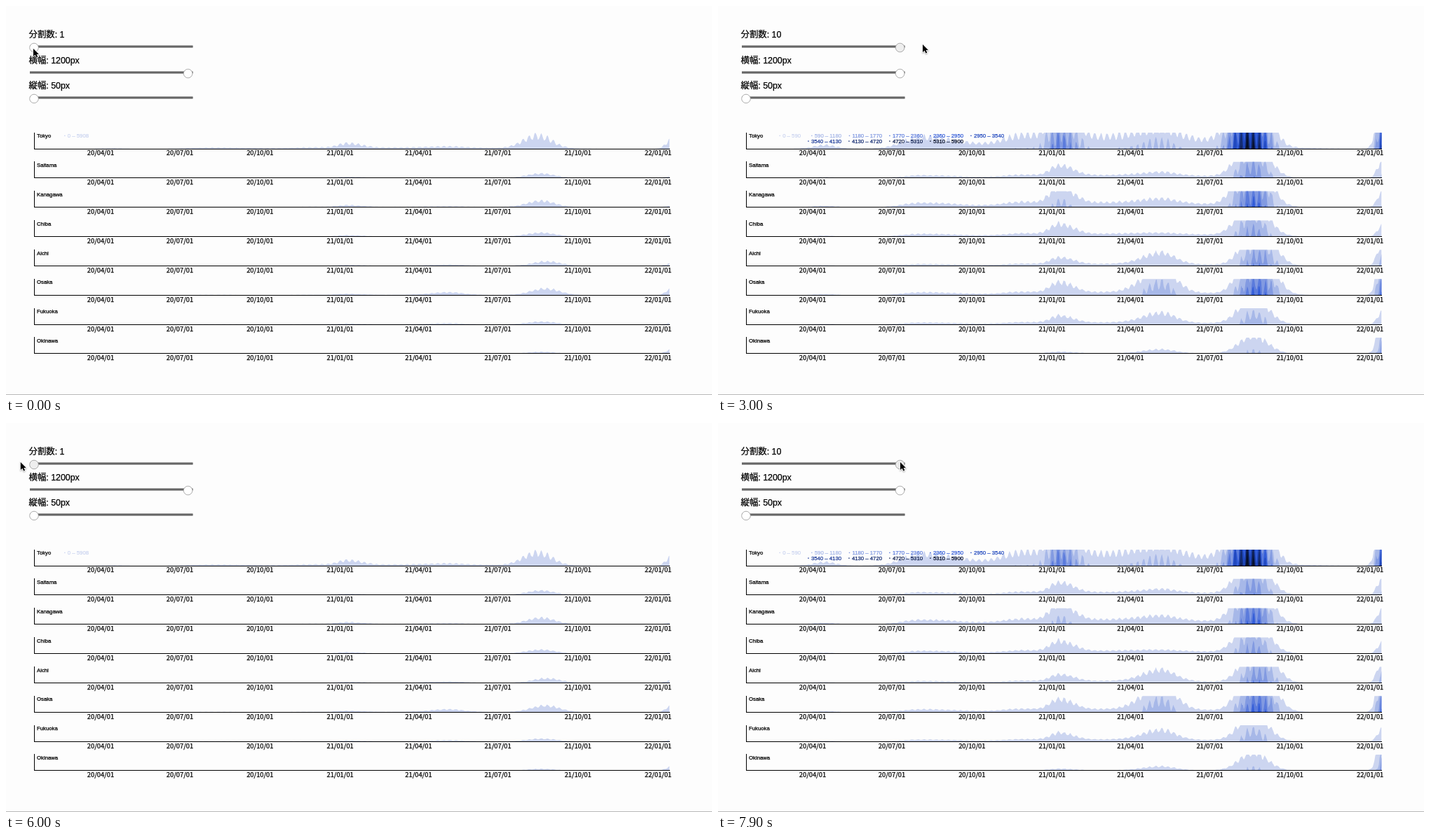
An HTML page with a canvas that plays this animation: 1007x556 px, repeating every 8000 ms.

```html
<!DOCTYPE html>
<html lang="ja">
<head>
<meta charset="utf-8">
<title>Horizon chart</title>
<style>
html, body { margin: 0; width: 100%; height: 100%; overflow: hidden; background: #fdfdfd; }
canvas { display: block; }
</style>
</head>
<body>
<canvas id="stage" width="1007" height="556"></canvas>
<script>
const ctx = document.getElementById('stage').getContext('2d');
const LOOP = 8000, FRAME = 100;
const LEFT = 40.5, RIGHT = 947, DAY = 1.2425, DAYS = 730;
const BAND = 23, FIRST_BASE = 204, ROW = 41.85, MAX = 5908;
const LATIN = '"Liberation Sans", "Noto Sans CJK JP", "Noto Sans CJK", sans-serif';
const JAPANESE = '"Noto Sans CJK JP", "Noto Sans CJK", "Noto Sans", sans-serif';

// Smooth curve through points that never overshoots them.
function curve(xs, ys) {
  const last = xs.length - 1;
  const secant = i => (ys[i + 1] - ys[i]) / (xs[i + 1] - xs[i]);
  const slope = xs.map((_, i) => {
    if (i === 0) return secant(0);
    if (i === last) return secant(last - 1);
    const a = secant(i - 1), b = secant(i);
    return a * b > 0 ? 2 * a * b / (a + b) : 0;
  });
  return x => {
    if (x <= xs[0]) return ys[0];
    if (x >= xs[last]) return ys[last];
    let i = 0;
    while (x > xs[i + 1]) i++;
    const h = xs[i + 1] - xs[i], u = (x - xs[i]) / h, v = 1 - u;
    return v * v * ((1 + 2 * u) * ys[i] + u * h * slope[i])
         + u * u * ((1 + 2 * v) * ys[i + 1] - v * h * slope[i + 1]);
  };
}

const hill = (x, center, rise, fall = rise) =>
  Math.exp(-0.5 * ((x - center) / (x < center ? rise : fall)) ** 2);

const noise = (a, b) => {
  const s = Math.sin(a * 12.9898 + b * 78.233) * 43758.5453;
  return s - Math.floor(s);
};

// Wave heights per region; lag moves the summer wave to the right.
const REGIONS = [
  { name: 'Tokyo', winter: 1600, spring: 320, summer: 4500, newYear: 3000, lag: 0 },
  { name: 'Saitama', winter: 380, spring: 110, summer: 1550, newYear: 640, lag: 5 },
  { name: 'Kanagawa', winter: 640, spring: 130, summer: 2250, newYear: 580, lag: 5 },
  { name: 'Chiba', winter: 380, spring: 30, summer: 1350, newYear: 400, lag: 5 },
  { name: 'Aichi', winter: 260, spring: 400, summer: 1550, newYear: 900, lag: 13 },
  { name: 'Osaka', winter: 400, spring: 900, summer: 2300, newYear: 2050, lag: 11 },
  { name: 'Fukuoka', winter: 260, spring: 340, summer: 960, newYear: 460, lag: 6 },
  { name: 'Okinawa', winter: 60, spring: 140, summer: 640, newYear: 1400, lag: 6 }
];

// The minor waves and the long plateau scale with the winter wave.
const level = (x, r) =>
  r.winter * (0.08 * hill(x, 152, 16) + 0.25 * hill(x, 290, 26, 55)
    + 0.22 * hill(x, 435, 28) + hill(x, 487, 13, 20) + 0.3 * hill(x, 600, 100))
  + r.spring * hill(x, 632, 25, 20)
  + r.summer * hill(x, 758 + r.lag, 20)
  + r.newYear * hill(x, 948, 7);

const rows = REGIONS.map((region, r) => {
  const swing = r === 0 ? 0.29 : 0.2;
  const days = Array.from({ length: DAYS }, (_, d) => {
    const week = 1 + swing * Math.cos(2 * Math.PI * (d - 575) / 7);
    const jitter = 0.93 + 0.14 * noise(d, r);
    return Math.min(MAX, level(LEFT + d * DAY, region) * week * jitter);
  });
  return { name: region.name, days, base: FIRST_BASE + r * ROW };
});

const START = Date.UTC(2020, 0, 16);
const ticks = Array.from({ length: 8 }, (_, i) => {
  const date = new Date(Date.UTC(2020, 3 + 3 * i, 1));
  return {
    x: LEFT + (date - START) / 864e5 * DAY,
    label: date.toISOString().slice(2, 10).replace(/-/g, '/')
  };
});

// Pointer path: time, x, y.
const PATH = [[0, 39, 61], [600, 41, 61], [1200, 105, 56.5], [2700, 292, 55],
  [3300, 292, 55], [4200, 171, 63], [4900, 70, 56], [5450, 15, 56],
  [5900, 18, 56], [6900, 120, 56], [7900, 260, 56]];
const times = PATH.map(p => p[0]);
const pointerX = curve(times, PATH.map(p => p[1]));
const pointerY = curve(times, PATH.map(p => p[2]));
const KNOB_MIN = 40, KNOB_STEP = 24.4, DRAG_DELAY = 45;

function bandsAt(t) {
  const n = 1 + Math.round((pointerX(t - DRAG_DELAY) - KNOB_MIN) / KNOB_STEP);
  return Math.max(1, Math.min(10, n));
}

function bandColor(i, n) {
  const f = i / n;
  return `hsl(225, ${55 + 16 * Math.min(1, f * 2)}%, ${87 * (1 - f)}%)`;
}

function text(str, x, y, size, family = LATIN, align = 'left', color = '#000') {
  ctx.font = `${size}px ${family}`;
  ctx.textAlign = align;
  ctx.fillStyle = ctx.strokeStyle = color;
  ctx.lineWidth = 0.25;
  ctx.fillText(str, x, y);
  ctx.strokeText(str, x, y);
}

function slider(label, y, knobX, active) {
  text(label, 32.5, y - 12.6, 12.4);
  ctx.fillStyle = '#a4a4a4';
  ctx.fillRect(34, y - 2, 232.5, 4);
  ctx.fillStyle = '#666';
  ctx.fillRect(34, y - 1, 232.5, 2);
  ctx.beginPath();
  ctx.arc(knobX, y + 1.5, 6.3, 0, 2 * Math.PI);
  ctx.fillStyle = active ? '#eee' : '#fff';
  ctx.fill();
  ctx.strokeStyle = '#999';
  ctx.lineWidth = 0.8;
  ctx.stroke();
}

function horizon(days, base, n) {
  const step = Math.floor(MAX / n);
  for (let i = 0; i < n; i++) {
    ctx.beginPath();
    ctx.moveTo(LEFT, base);
    days.forEach((v, d) => {
      const part = Math.max(0, Math.min(1, (v - i * step) / step));
      ctx.lineTo(LEFT + d * DAY, base - part * BAND);
    });
    ctx.lineTo(LEFT + (DAYS - 1) * DAY, base);
    ctx.fillStyle = bandColor(i, n);
    ctx.fill();
  }
}

function axes(name, base) {
  const y = Math.floor(base);
  ctx.fillStyle = '#000';
  ctx.fillRect(40, y - 23, 1, 24);
  ctx.fillRect(40, y, RIGHT - 40, 1);
  text(name, 44, base - 15.8, 7.75);
  for (const tick of ticks) text(tick.label, tick.x, base + 9.4, 9.3, JAPANESE, 'center');
}

function legend(n) {
  const step = Math.floor(MAX / n), half = Math.floor(n / 2);
  for (let i = 0; i < n; i++) {
    const lower = i > half;
    const right = 118 + 58 * (lower ? i - half : i);
    const y = lower ? 196 : 188.2;
    const label = `${i * step} – ${(i + 1) * step}`;
    text(label, right, y, 7.75, LATIN, 'right', bandColor(i, n));
    ctx.fillRect(right - ctx.measureText(label).width - 4.7, y - 3.5, 1.4, 1.4);
  }
}

function pointer(x, y) {
  ctx.save();
  ctx.translate(x, y);
  ctx.beginPath();
  [[0, 0], [0, 11], [2.6, 8.7], [4.4, 12.6], [6.3, 11.8], [4.6, 8], [7.9, 7.9]]
    .forEach(p => ctx.lineTo(...p));
  ctx.closePath();
  ctx.shadowColor = 'rgba(0, 0, 0, 0.35)';
  ctx.shadowBlur = 2;
  ctx.shadowOffsetY = 1;
  ctx.strokeStyle = '#fff';
  ctx.lineWidth = 1.4;
  ctx.stroke();
  ctx.shadowColor = 'transparent';
  ctx.fillStyle = '#000';
  ctx.fill();
  ctx.restore();
}

function draw(now) {
  const t = Math.floor(now % LOOP / FRAME) * FRAME;
  const n = bandsAt(t);
  ctx.fillStyle = '#fdfdfd';
  ctx.fillRect(0, 0, 1007, 556);
  ctx.fillStyle = '#b8b8b8';
  ctx.fillRect(0, 555, 1007, 1);

  slider(`分割数: ${n}`, 58, KNOB_MIN + (n - 1) * KNOB_STEP, t >= 300);
  slider('横幅: 1200px', 95, 259.6, false);
  slider('縦幅: 50px', 131, KNOB_MIN, false);

  for (const { name, days, base } of rows) {
    horizon(days, base, n);
    axes(name, base);
  }
  legend(n);
  pointer(pointerX(t), pointerY(t));
}

const began = performance.now();
function loop() {
  draw(performance.now() - began);
  requestAnimationFrame(loop);
}
loop();
</script>
</body>
</html>
```
